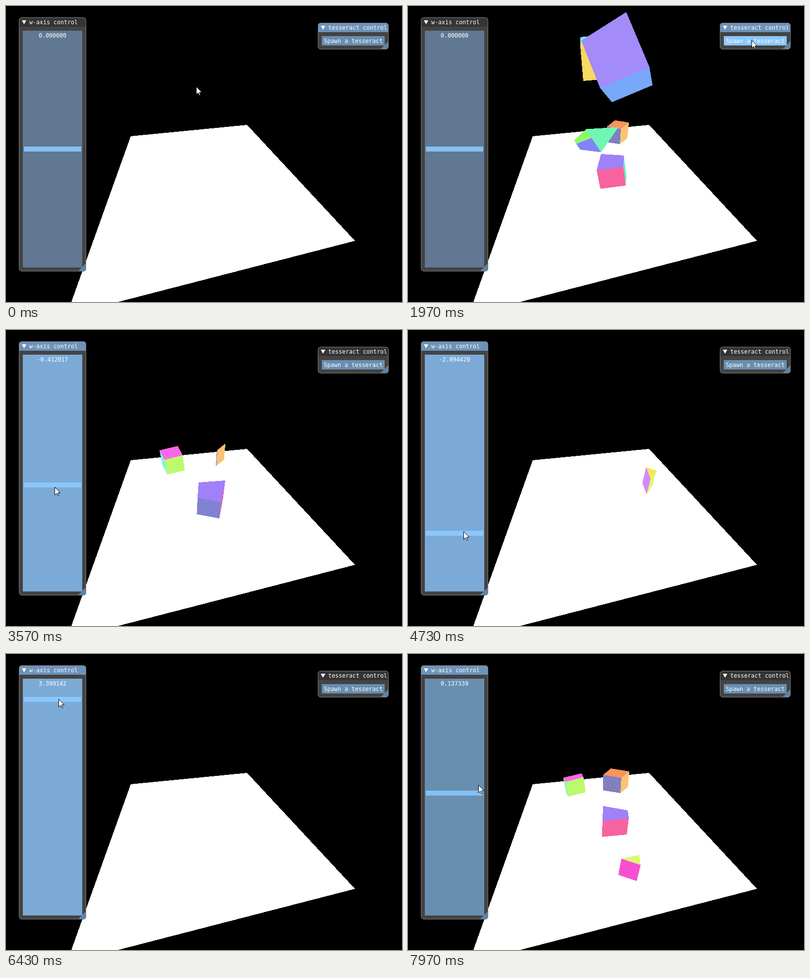
Animation of 800 by 600 pixels, one loop 8 s. Source, as an HTML page:

```html
<!DOCTYPE html>
<html lang="en">
<head>
<meta charset="utf-8">
<title>w-axis control</title>
<style>
html, body { margin: 0; width: 100%; height: 100%; overflow: hidden; background: #000; }
svg { display: block; }
text { font: 11.63px "DejaVu Sans Mono", monospace; fill: #fff; }
</style>
</head>
<body>
<svg width="800" height="600">
  <g shape-rendering="crispEdges">
    <polygon points="252,264 487,241 705,476 226,600 132,600" fill="#fff"/>
    <g id="scene"></g>
  </g>
  <g id="sliderPanel" transform="translate(26 23)"></g>
  <rect id="track" x="34" y="50" width="120" height="480"/>
  <rect id="handle" x="36" width="116" height="10"/>
  <text id="value" x="94" y="64" text-anchor="middle"></text>
  <g id="spawnPanel" transform="translate(630 34)"></g>
  <rect id="button" x="638" y="61" width="127" height="19"/>
  <text x="642" y="75">Spawn a tesseract</text>
  <path id="pointer" d="M.5 .5v16l3.5-3.5 3 5.5 2-1-2.5-5.5h5z" fill="#fff" stroke="#000"/>
</svg>
<script>
const LOOP = 8000, DRAG_START = 3400, DRAG_END = 7950;
const DROP_SPEED = 1.05, SHRINK_MS = 800;
const ui = Object.fromEntries([...document.querySelectorAll('[id]')].map(el => [el.id, el]));

const ORANGE = '#f9945a', NAVY = '#8080c0', PEACH = '#f9c473', PURPLE = '#a081fa', PINK = '#f763a0';
const LIME = '#dff774', VIOLET = '#d688fa', YELLOW = '#f7e65a', MAGENTA = '#f74fd0', BLUE = '#78a8fa';
const GREEN = '#b0f77a', CYAN = '#74e4fa';

// A box seen from its near corner: three edges a, b, c leave that corner.
// colors = [face ab, face ac, face bc]; far is the corner opposite on face ab.
const add = (p, q, k = 1) => [p[0] + q[0] * k, p[1] + q[1] * k];
const box = (corner, a, b, c, colors, far = add(a, b), depth = .95) => ({ corner, a, b, c, colors, far, depth });

function drawBox({ corner, a, b, c, colors, far, depth }, scale = 1, dy = 0) {
  const face = (color, ...edges) => `<polygon fill="${color}" points="${
    [[0, 0], ...edges].map(e => add(add(corner, [0, dy]), e, scale)).join(' ')}"/>`;
  return face(colors[2], b, add(c, b, depth), c) +
    face(colors[1], a, add(c, a, depth), c) +
    face(colors[0], a, far, b);
}

// A cross-section opens along edge a between "edge" and "full" on the w axis and is gone past "end".
const slice = (edge, full, end, shape) => ({ edge, full, end, shape });

function drawSlice({ edge, full, end, shape }, w, dy) {
  const open = Math.min(1, (w - edge) / (full - edge));
  if (open <= 0 || (end - w) / (full - edge) <= 0) return '';
  const lost = open - 1;
  return drawBox({
    ...shape,
    corner: add(shape.corner, [4, 7], lost),
    a: add(shape.a, shape.a, lost),
    far: add(shape.far, shape.a, lost)
  }, 1, dy);
}

const crate = (corner, colors) => box(corner, [-70, 6], [-9, -11], [-1, 71], colors, [-69, -5], .9);
const corner = (x, y, edge, full, end) =>
  slice(edge, full, end, box([x, y], [-43, 10], [-15, -15], [-3, 38], [VIOLET, BLUE, BLUE]));

// Each body drops past its starting pose at "seen", may lie in a second pose, then settles as slices.
const bodies = [
  { seen: 1200, land: 1300, settle: 1300,
    drop: crate([434, 143], [GREEN, BLUE, BLUE]),
    slices: [slice(-.43, .137, 1, box([431, 251], [-37, -6], [16, -13], [-2, 31], [ORANGE, NAVY, PEACH]))] },
  { seen: 1420, land: 1500, settle: 2150,
    drop: crate([434, 143], [VIOLET, '#8d6bfa', '#8d6bfa']),
    lying: box([371, 268], [-11, -18], [19, 29], [-31, 12], ['#70f7b5', '#8cf96c', '#8382fa'], [54, -22], .4),
    slices: [slice(.54, -.412, -1.1, box([320, 263], [-10, -19], [37, -9], [6, 30], ['#f968e8', '#7cf5e6', '#bcf96e']))] },
  { seen: 2042, land: 2250, settle: 2250,
    drop: crate([424, 143], [CYAN, '#f8d860', '#f8d860']),
    slices: [slice(-2.3, -2.094, -1.2,
      box([490, 302], [-9, -24], [12, -17], [-8, 31], [YELLOW, VIOLET, LIME], [1.5, -20.5]))] },
  { seen: 1200, land: 1260, settle: 2200,
    drop: box([415, 298], [-19, -16], [32, 5], [-31, 19], [YELLOW, VIOLET, LIME], [-3, -41], .7),
    lying: box([435, 326], [-54, 7], [1, -23], [5, 38], [PURPLE, PINK, '#5ff0d0'], [-45, -26]),
    slices: [
      slice(.8, .4, -.2, box([446, 333], [-53, 5], [-2, -16], [-4, 33], [PURPLE, PINK, PINK], [-52, -25])),
      slice(-.95, -.6, -.2, box([435, 349], [-48, -9], [8, -44], [-4, 33], [PURPLE, '#8282d4', PINK], [-46, -40]))] },
  { seen: 1970, land: 2200, settle: 2200,
    drop: box([388, 165], [-38, -96], [100, -42], [24, 29], ['#a38bfa', BLUE, BLUE], [53, -154], .82),
    slices: [slice(-.3, .137, .8, box([470, 428], [-39, -13], [-3, -21], [-8, 32], [LIME, MAGENTA, MAGENTA], [-3, -21]))] },
  { settle: 0, slices: [corner(655, 440, -1.9, -1.3, -.6), corner(690, 448, .6, 1.4, 3)] }
];

function drawBody(body, t, w) {
  const { seen, land, settle, drop, lying, slices } = body;
  if (t < land) return drawBox(drop, Math.exp((seen - t) / SHRINK_MS), (t - seen) * DROP_SPEED);
  const bounce = since => -25 * Math.exp((since - t) / 120);
  if (t < settle) return drawBox(lying, 1, bounce(land));
  return slices.map(s => drawSlice(s, w, settle ? bounce(settle) : 0)).join('');
}

// Piecewise linear path through a few [time, ...values] points.
function along(path, t) {
  const i = path.findIndex(point => point[0] > t);
  if (i < 1) return path.at(i).slice(1);
  const [t0, ...from] = path[i - 1], [t1, ...to] = path[i];
  return from.map((v, j) => v + (to[j] - v) * (t - t0) / (t1 - t0));
}
const approach = [[40, 384, 163], [680, 694, 69], [2540, 694, 69], [3330, 98, 290]];
const sliderPath = [[DRAG_START, 290], [3570, 314], [4250, 465], [4450, 465], [4730, 412],
  [6430, 92], [6600, 84], [6730, 84], [7470, 282]];
const dragX = [[3570, 98], [4730, 112], [6430, 106], [7730, 108]];

function pointerAt(t) {
  if (t < DRAG_START) return along(approach, t);
  if (t >= DRAG_END) return [142, 265];
  return [along(dragX, t)[0], along(sliderPath, t + 18)[0]];
}

function buildPanel(group, w, h, title) {
  group.innerHTML = `
    <rect width="${w}" height="${h}" rx="6" fill="#434343"/>
    <path class="bar" d="M0 19V6a6 6 0 0 1 6-6H${w - 6}a6 6 0 0 1 6 6V19z"/>
    <path d="M${w} ${h - 17}V${h - 6}a6 6 0 0 1-6 6H${w - 17}z" fill="#5f83a6"/>
    <rect x=".5" y=".5" width="${w - 1}" height="${h - 1}" rx="6" fill="none" stroke="#7d7d7d"/>
    <path d="M6 6h9l-4.5 8z" fill="#fff"/>
    <text x="21" y="14">${title}</text>`;
}
buildPanel(ui.sliderPanel, 136, 515, 'w-axis control');
buildPanel(ui.spawnPanel, 143, 54, 'tesseract control');

const paint = (el, color) => el.setAttribute('fill', color);
const focus = (panel, on) => paint(panel.querySelector('.bar'), on ? '#6e93b9' : '#343434');

function draw(t) {
  const [px, py] = pointerAt(t).map(Math.round);
  const over = (x, y, w, h) => px >= x && px < x + w && py >= y && py < y + h;
  const dragging = t >= DRAG_START && t < DRAG_END;
  const pressed = bodies.some(({ seen }) => t > seen - 250 && t < seen - 160);
  const level = Math.round(along(sliderPath, t)[0]);
  const w = 4 - 8 * Math.fround((level - 57) / 466);

  ui.scene.innerHTML = bodies.map(body => drawBody(body, t, w)).join('');
  focus(ui.sliderPanel, t >= DRAG_START);
  focus(ui.spawnPanel, t < DRAG_START);
  paint(ui.track, dragging ? '#7caad6' : over(34, 50, 120, 480) ? '#688fb0' : '#607892');
  paint(ui.handle, dragging ? '#8bc7ff' : '#84c0f3');
  paint(ui.button, pressed ? '#42b9ff' : over(638, 61, 127, 19) ? '#8ac6ff' : '#688fb0');
  ui.handle.setAttribute('y', level - 5);
  ui.value.textContent = w.toFixed(6);
  ui.pointer.setAttribute('transform', `translate(${px} ${py})`);
}

const start = performance.now();
function tick() {
  draw((performance.now() - start) % LOOP);
  requestAnimationFrame(tick);
}
tick();
</script>
</body>
</html>
```
